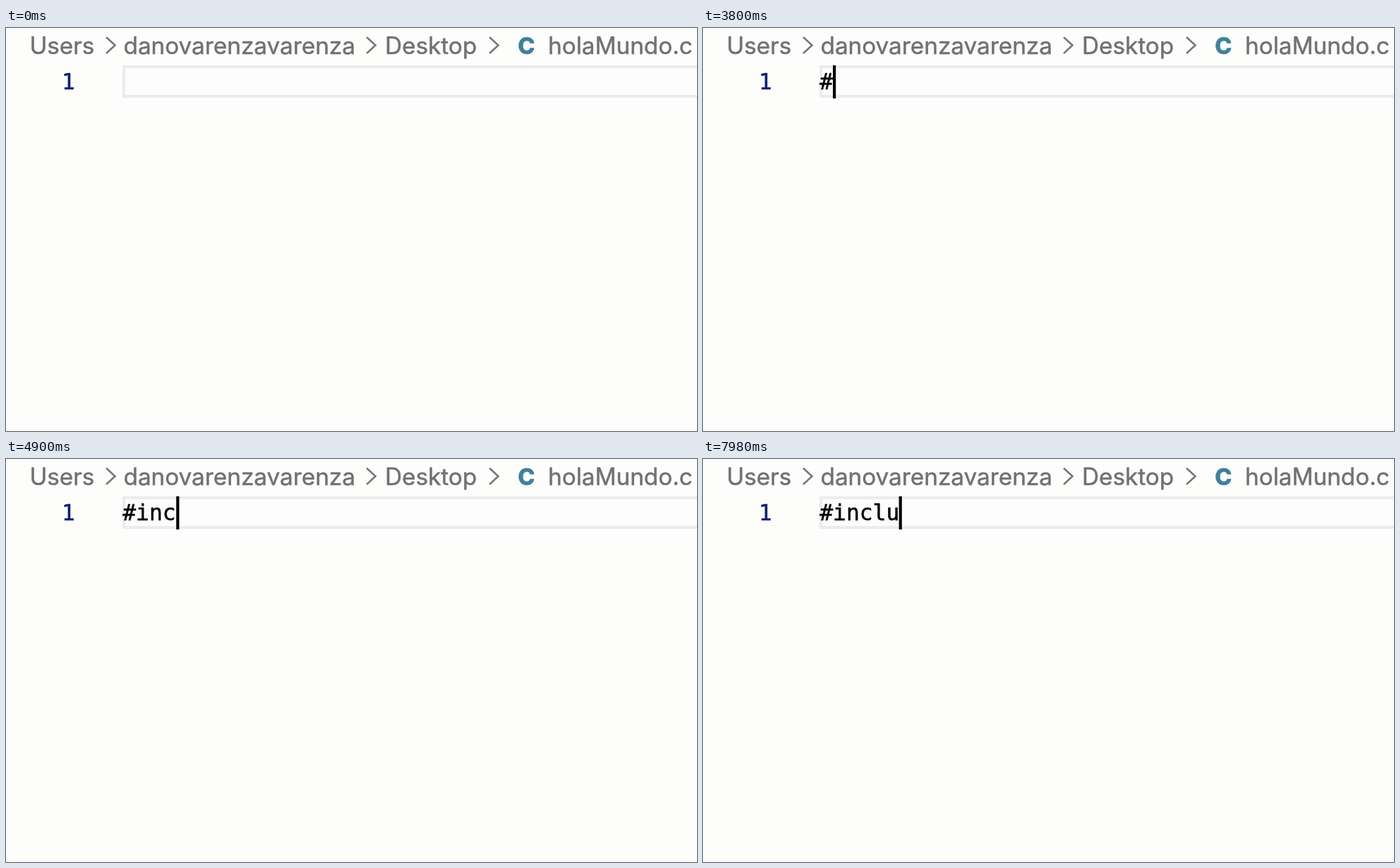
Write an HTML page with a canvas that moves like this. It is 979 px wide and 572 px high and loops after 8 s.

```html
<!DOCTYPE html>
<html lang="es">
<head>
<meta charset="utf-8">
<title>holaMundo.c</title>
<style>
html, body { margin: 0; width: 100%; height: 100%; overflow: hidden; background: #fdfdfc; }
canvas { display: block; width: 979px; height: 572px; }
</style>
</head>
<body>
<canvas id="stage" width="979" height="572"></canvas>
<script>
const ctx = document.getElementById('stage').getContext('2d');
const LOOP = 8000;
const W = 979, H = 572;
const PX = 2.6;          // size of one editor pixel
const CELL = 18.84;      // width of one code character
const UI = 'Inter, "Open Sans", sans-serif';
const MONO = '31.3px "DejaVu Sans Mono", monospace';

// moment at which each character is typed
const keys = [['#', 3340], ['i', 3900], ['n', 4480], ['c', 4900], ['l', 5740], ['u', 6660]];
const popupOn = 3940, popupOff = 4900;
const blinkOn = 1380, blinkOff = 2780;

function rect(x, y, w, h, color) {
  ctx.fillStyle = color;
  ctx.fillRect(x, y, w, h);
}

// the hairline outline gives the slightly heavy look of smoothed type
function text(str, x, y, color, font) {
  ctx.font = font;
  ctx.fillStyle = ctx.strokeStyle = color;
  ctx.lineWidth = 0.5;
  ctx.lineJoin = 'round';
  ctx.fillText(str, x, y);
  ctx.strokeText(str, x, y);
}

function chevron(x) {
  ctx.strokeStyle = '#767678';
  ctx.lineWidth = 2.5;
  ctx.lineJoin = 'miter';
  ctx.beginPath();
  ctx.moveTo(x, 13);
  ctx.lineTo(x + 12.5, 24.5);
  ctx.lineTo(x, 36);
  ctx.stroke();
}

function breadcrumbs() {
  const put = (str, x) => text(str, x, 36.5, '#717173', '33.3px ' + UI);
  put('Users', 33.5);
  chevron(142);
  put('danovarenzavarenza', 166.5);
  chevron(511);
  put('Desktop', 537);
  chevron(685);
  text('C', 725.2, 36.5, '#3e809b', '800 32.5px ' + UI);
  put('holaMundo.c', 768);
}

function lineBox() {
  const color = '#ebebf0';
  rect(165, 53, W - 165, 4, color);
  rect(165, 95, W - 165, 4, color);
  rect(165, 53, 4, 46, color);
}

function snippetIcon(x, y, color) {
  rect(x, y, 34, PX, color);
  rect(x, y, PX, 31, color);
  rect(x + 34 - PX, y, PX, 31, color);
  for (let i = 0; i < 7; i++) rect(x + i * 2 * PX, y + 33.5, PX, PX, color);
}

function item(label, typed, x, top, color, hit, icon) {
  snippetIcon(x + 12.7, top + 5.5, icon);
  let next = 0;
  [...label].forEach((ch, i) => {
    const match = ch === typed[next];
    if (match) next++;
    text(ch, x + 59 + i * CELL, top + 33.5, match ? hit : color, (match ? 'bold ' : '') + MONO);
  });
}

function popup(x, typed) {
  rect(x, 100, W - x, 104, '#c3c3c8');
  rect(x + 1.5, 102, W - x, 100.5, '#efeff3');
  rect(x + 2, 102.5, W - x, 47.5, '#0058ba');
  item('#region', typed, x, 102.5, '#ffffff', '#bbe7ff', '#ffffff');
  item('#endregion', typed, x, 149.5, '#000000', '#0060ba', '#55555a');
}

function draw(t) {
  const typed = keys.filter(k => t >= k[1]).map(k => k[0]).join('');
  // the caret snaps to whole editor pixels
  const caret = 165.8 + Math.round(typed.length * CELL / 2.608) * PX;

  rect(0, 0, W, H, '#fdfdfc');
  breadcrumbs();
  lineBox();
  text('1', 79, 87, '#0b216f', MONO);
  [...typed].forEach((ch, i) => text(ch, 165.2 + i * CELL, 87, '#000000', MONO));

  if (t >= popupOn && t < popupOff) popup(caret + 0.2, typed);
  if (typed || (t >= blinkOn && t < blinkOff)) rect(caret, 53, 4.2, 47, '#000000');
}

function tick() {
  draw(performance.now() % LOOP);
  requestAnimationFrame(tick);
}
tick();
</script>
</body>
</html>
```
